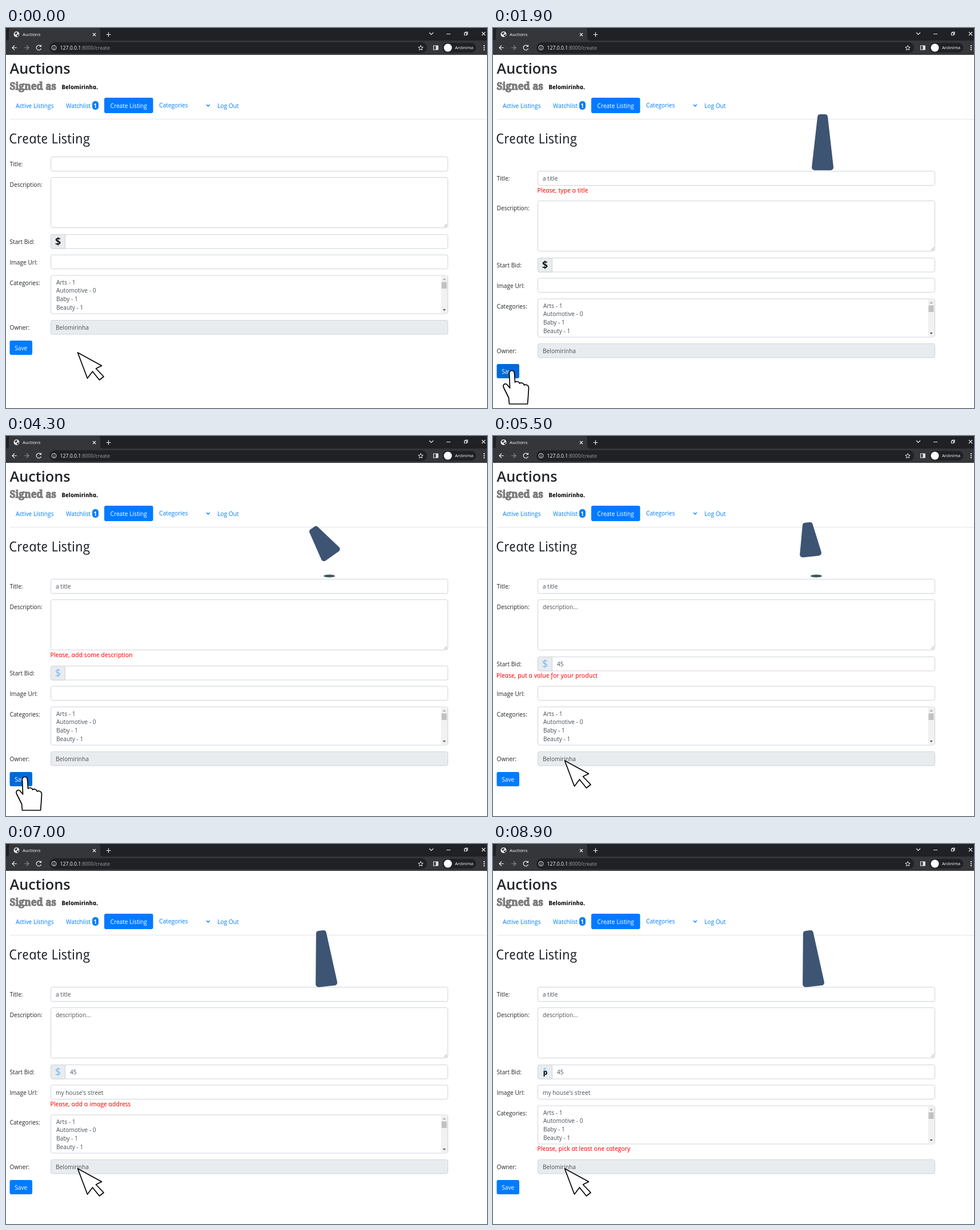
These frames come from a looping animation (842x665 px, 9100 ms). An HTML page:

```html
<!DOCTYPE html>
<html lang="en">
<head>
<meta charset="utf-8">
<title>Auctions</title>
<style>
  html, body { margin: 0; height: 100%; overflow: hidden; background: #fff; }
  svg { display: block; }
  text { font: 10.2px "Open Sans", "Noto Sans", sans-serif; fill: #212529; white-space: pre; }
  /* upright italics give single-storey, handwritten letters */
  .hand { font-style: italic; transform: skewX(12deg); transform-box: fill-box; transform-origin: left 78.5%; }
  .error { font-size: 11.3px; fill: red; visibility: hidden; }
  .value, .option { fill: #495057; }
  .link { fill: #007bff; }
  .white { fill: #fff; }
  .field { fill: #fff; stroke: #ced4da; }
  .addon { fill: #e9ecef; stroke: #ced4da; }
  .icon { fill: none; stroke: #e8eaed; stroke-width: 1.2; }
  .outline { fill: #fff; stroke: #000; stroke-width: 1.7; stroke-linejoin: round; }
</style>
</head>
<body>
<svg width="842" height="665" viewBox="0 0 842 665">
  <!-- browser window -->
  <rect width="842" height="47" fill="#202124"/>
  <path d="M0 22Q5 22 5 17V5Q5 0 10 0H160Q165 0 165 5V17Q165 22 170 22H842V47H0Z" fill="#35363a"/>
  <circle cx="18.5" cy="11" r="5" fill="#e8eaed"/>
  <path d="M15 9l4-2 1 2-3 3zM19 12l4-1-2 4-2-1z" fill="#35363a"/>
  <text x="29" y="14" class="white" style="font-size:7.8px">Auctions</text>
  <path class="icon" d="M152 9l5 5m0-5l-5 5M175.5 11.5h8m-4-4v8M741 8l3.5 3.5L748 8M771 10.5h7M802.5 8.500h4v4h-4zM804 8V7h4v4h-1M833 7l6 6m0-6l-6 6"/>
  <path class="icon" d="M19 34.5h-8m4-4l-4 4 4 4M61 32a4.300 4.300 0 1 0 .5 4M61.5 29.5v3h-3"/>
  <path class="icon" d="M32 34.5h8m-4-4l4 4-4 4" style="stroke:#85878b"/>
  <rect x="76" y="25" width="661" height="19" rx="9.5" fill="#202124"/>
  <g class="icon" style="stroke-width:1"><circle cx="84" cy="34.5" r="4"/><path d="M84 34v3M84 32v1"/></g>
  <text x="94.5" y="37.8" class="white" style="font-size:8.7px">127.0.0.1<tspan fill="#9aa0a6">:8000/create</tspan></text>
  <path class="icon" style="stroke-width:1" d="M726 30.5l1.2 2.800 3 .3-2.300 2 .7 3-2.600-1.600-2.600 1.600.7-3-2.300-2 3-.3z"/>
  <path class="icon" d="M748.5 31h7.5v7h-7.5z"/>
  <rect x="752.5" y="31" width="4" height="7" fill="#e8eaed"/>
  <rect x="764" y="26" width="59" height="17" rx="8.5" fill="#202124"/>
  <circle cx="773.5" cy="34.5" r="7" fill="#fff"/>
  <text x="786" y="37.3" class="white" style="font-size:7.6px">Anônima</text>
  <path d="M836 30h2v2h-2zm0 3.500h2v2h-2zm0 3.500h2v2h-2z" fill="#e8eaed"/>

  <!-- page header -->
  <text x="6.5" y="80" style="font-size:25.3px;font-weight:600">Auctions</text>
  <text x="6.5" y="108" style="font:900 17.2px 'Noto Serif',serif;fill:#888;stroke:#666;stroke-width:.9">Signed as</text>
  <text x="98" y="107" class="hand" style="font-size:10.5px;font-weight:700;fill:#000">Belomirinha.</text>
  <text x="17" y="139.5" class="link">Active Listings</text>
  <text x="105" y="139.5" class="link">Watchlist</text>
  <rect x="151" y="128" width="11" height="15" rx="5" fill="#007bff"/>
  <text x="153.2" y="139.5" class="white" style="font-weight:700">1</text>
  <rect x="172" y="122" width="85.5" height="27" rx="3" fill="#007bff"/>
  <text x="182.5" y="139.5" class="white">Create Listing</text>
  <text x="268" y="139" class="link">Categories</text>
  <path d="M351 134l2.800 2.800 2.800-2.800" fill="none" stroke="#007bff" stroke-width="1.4"/>
  <text x="370" y="139.5" class="link">Log Out</text>
  <path d="M7 159.5H842" stroke="#e5e5e5"/>
  <text x="6.5" y="202" class="hand" style="font-size:24px">Create Listing</text>

  <!-- form -->
  <g class="row">
    <text x="6.5" y="242">Title:</text>
    <rect class="field" x="78.5" y="225.5" width="695" height="25" rx="3"/>
    <text class="value" x="87" y="242"></text>
    <text class="hand error" x="78" y="263">Please, type a title</text>
  </g>
  <g class="row">
    <text x="6.5" y="278">Description:</text>
    <rect class="field" x="78.5" y="261.5" width="695" height="88" rx="3"/>
    <path d="M767 348l5-5m-2 5l2-2" stroke="#777" stroke-width=".8"/>
    <text class="value" x="87" y="278"></text>
    <text class="hand error" x="78" y="362.5">Please, add some description</text>
  </g>
  <g class="row">
    <text x="6.5" y="377.5">Start Bid:</text>
    <rect class="field" x="78.5" y="361.5" width="695" height="24.5" rx="3"/>
    <path class="addon" d="M103.5 361.5V386H81.5Q78.5 386 78.5 383V364.5Q78.5 361.5 81.5 361.5Z"/>
    <text id="dollar" x="91" text-anchor="middle">$</text>
    <text id="flip" x="91.5" y="379" text-anchor="middle" style="font-size:12px;font-weight:700;fill:#000">p</text>
    <text class="value" x="112" y="377.5"></text>
    <text class="hand error" x="6.5" y="398.5">Please, put a value for your product</text>
  </g>
  <g class="row">
    <text x="6.5" y="413.5">Image Url:</text>
    <rect class="field" x="78.5" y="397" width="695" height="24.5" rx="3"/>
    <text class="value" x="87" y="413.5"></text>
    <text class="hand error" x="78" y="434">Please, add a image address</text>
  </g>
  <g class="row">
    <text x="6.5" y="449.5">Categories:</text>
    <rect class="field" x="78.5" y="433" width="695" height="67" rx="3"/>
    <svg id="options" x="79" y="433.5" width="682" height="65.5"></svg>
    <path d="M761.5 433.5h11.500v66h-11.500z" fill="#f1f1f1"/>
    <path d="M762.5 444.5h9v11.500h-9z" fill="#c1c1c1"/>
    <path d="M764.5 441l2.700-3 2.700 3z" fill="#a3a3a3"/>
    <path d="M764.5 492l2.700 3 2.700-3z" fill="#505050"/>
    <text class="hand error" x="78" y="512.5">Please, pick at least one category</text>
  </g>
  <g class="row">
    <text x="6.5" y="527.5">Owner:</text>
    <rect class="addon" x="78.5" y="511.5" width="695" height="24.5" rx="3"/>
    <text x="87" y="528" style="fill:#495057">Belomirinha</text>
    <rect id="save" x="6.5" y="547" width="39.5" height="25" rx="3"/>
    <text x="26.2" y="563.5" class="white" text-anchor="middle">Save</text>
  </g>

  <!-- dancer and pointer -->
  <ellipse id="shadow" cx="566" cy="245" rx="10" ry="2.5" fill="#3f5a5c"/>
  <path id="dancer" d="M-4-1H4L14 0H-14Z" fill="#3d5473" stroke="#3d5473" stroke-width="10" stroke-linejoin="round" vector-effect="non-scaling-stroke"/>
  <path id="arrow" class="outline" d="M0 0L17 45 26 33 38 48 45.5 42 32 28 42 23Z"/>
  <path id="finger" class="outline" d="M-4 4C-4-2 5-2 5 4L6 20C8 18 13 18 14 22C17 20 21 21 22 25C25 23 30 25 30 30L29 46 28 58H-4L-5 47-14 29C-16 24-11 21-8 24L-3 30Z"/>
</svg>
<script>
const LOOP = 9100, STEP = 100, TRAVEL = 300, PAUSE = 400;
const REST = { x: 125.5, y: 568 }, SAVE_X = 32.5;

// Each round: the pointer reaches Save, an error appears, its field gets typed
const rounds = [
  { arrive: 500, error: 800, y: 566, text: 'a title', pace: 70 },
  { arrive: 1900, error: 2100, y: 600, text: 'description...', pace: 130 },
  { arrive: 4300, error: 4400, y: 597, text: '45', pace: 200 },
  { arrive: 5800, error: 6000, y: 600, text: "my house's street", pace: 35 },
  { arrive: 7400, error: 7500, y: 606, text: '' }
];

// Key poses: feet position, lift off the floor and lean in degrees
const poses = [
  { at: 1900, x: 577, lift: 0, lean: 0 },
  { at: 3300, x: 574, lift: 0, lean: 14 },
  { at: 4300, x: 568, lift: 38, lean: -35 },
  { at: 5500, x: 556, lift: 38, lean: -6 },
  { at: 7000, x: 561, lift: 0, lean: -6 }
];

const $ = id => document.getElementById(id);
const all = selector => [...document.querySelectorAll(selector)];
const show = (element, on) => element.style.visibility = on ? 'visible' : 'hidden';
const clamp = v => Math.max(0, Math.min(1, v));
const mix = (a, b, k) => a + (b - a) * k;
const ease = k => k * k * (3 - 2 * k);
const rows = all('.row'), values = all('.value'), errors = all('.error');

$('options').innerHTML = ['Arts - 1', 'Automotive - 0', 'Baby - 1', 'Beauty - 1', 'Books - 0']
  .map((name, i) => `<text class="option" x="9" y="${15 + i * 14.67}">${name}</text>`).join('');

function drawForm(t, current) {
  rows.forEach((row, i) => {
    const shift = current < 0 ? 0 : i > current ? 41 : 25;
    row.setAttribute('transform', `translate(0 ${shift})`);
  });
  errors.forEach((error, i) => show(error, i === current));
  values.forEach((value, i) => {
    const { error, text, pace } = rounds[i];
    const count = Math.max(0, Math.floor((t - error - PAUSE) / pace));
    value.textContent = text.slice(0, count);
  });
  // The description empties while it is being saved
  if (t >= rounds[2].arrive - STEP && t < rounds[2].error) values[1].textContent = '';

  const dark = current < 1, flipping = current === 4;
  $('dollar').style.cssText =
    `font-size:${flipping ? 12 : 18.5}px;font-weight:${dark ? 600 : 400};fill:${dark ? '#000' : '#78b8f8'}`;
  $('dollar').setAttribute('y', flipping ? 376 : 380);
  show($('flip'), flipping);
}

function drawPointer(t) {
  const { arrive, error, y } = rounds.find(r => t < r.error + TRAVEL) || rounds.at(-1);
  const k = clamp(Math.min(t - arrive + TRAVEL, error + TRAVEL - t) / TRAVEL);
  const position = `translate(${mix(REST.x, SAVE_X, k)} ${mix(REST.y, y, k)})`;
  for (const id of ['arrow', 'finger']) {
    $(id).setAttribute('transform', position);
    show($(id), (id === 'finger') === (k === 1));
  }
  $('save').setAttribute('fill', k === 1 ? '#0069d9' : '#007bff');
}

function drawDancer(t) {
  const next = poses.find(p => p.at > t) || poses.at(-1);
  const last = poses.findLast(p => p.at <= t) || poses[0];
  const k = ease(clamp((t - last.at) / (next.at - last.at || 1)));
  const [x, lift, lean] = ['x', 'lift', 'lean'].map(name => mix(last[name], next[name], k));
  // Sideways swing after landing
  const swing = t > 7000 ? 16 * Math.sin((t - 7000) / 1900 * 2 * Math.PI) : 0;
  const height = 88 - lift;
  $('dancer').setAttribute('transform',
    `translate(${x} ${244 - lift}) rotate(${lean + swing}) scale(1 ${height})`);
  const visible = t >= rounds[0].error;
  show($('dancer'), visible);
  show($('shadow'), visible && lift > 12);
}

function tick() {
  const t = Math.floor(performance.now() % LOOP / STEP) * STEP;
  drawForm(t, rounds.findLastIndex(r => r.error <= t));
  drawPointer(t);
  drawDancer(t);
  requestAnimationFrame(tick);
}
tick();
</script>
</body>
</html>
```
